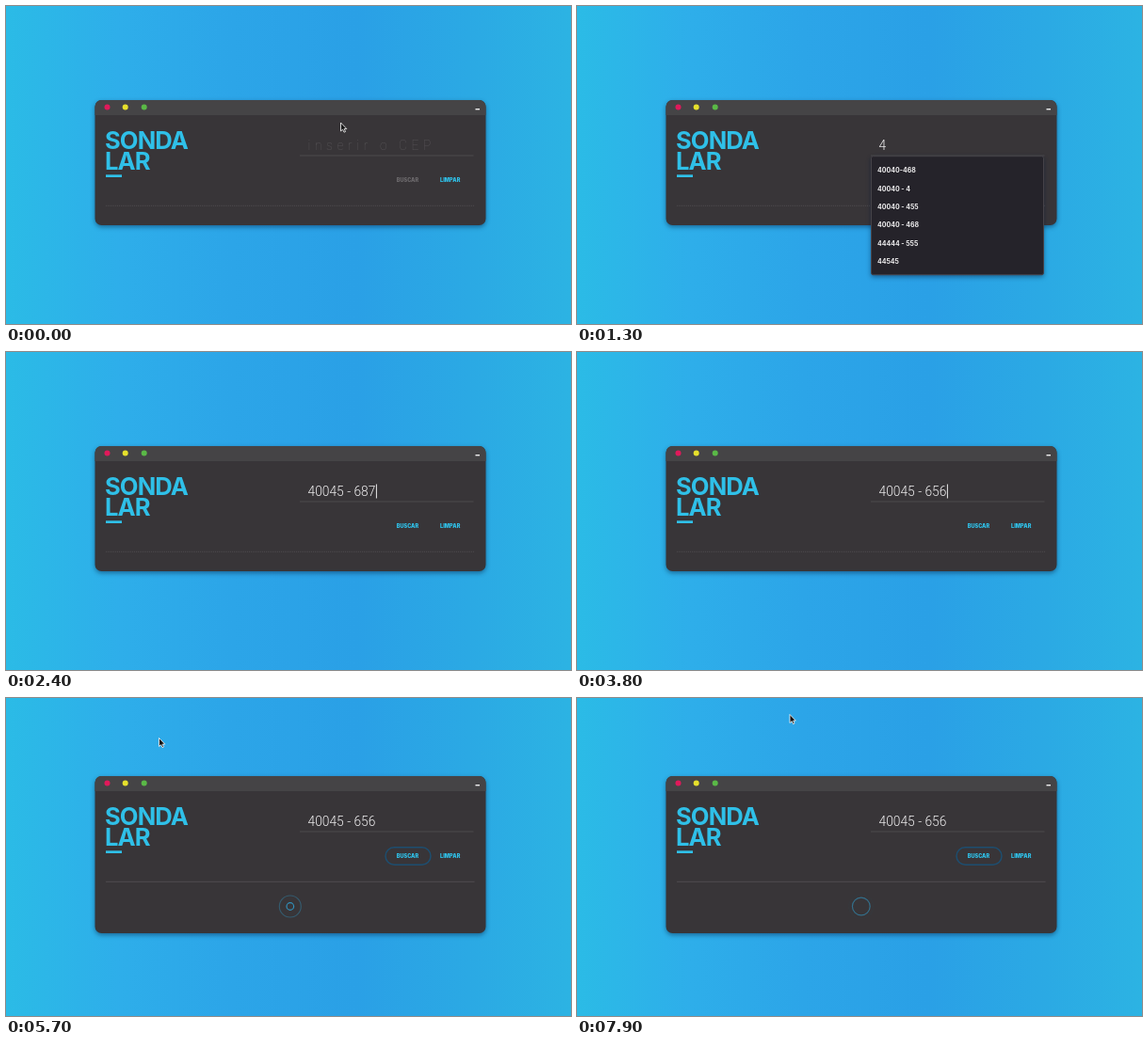
These frames come from a looping animation (600 px wide and 338 px high, 8 s). An HTML page:

```html
<!DOCTYPE html>
<html lang="pt-BR">
<head>
<meta charset="utf-8">
<title>Consulta</title>
<style>
  html, body { margin: 0; width: 100%; height: 100%; overflow: hidden; background: #2ba8e7; }
  svg { display: block; width: 600px; height: 338px; }
  text { white-space: pre; }
  .title { font: 700 25.6px Inter, sans-serif; letter-spacing: -.9px; fill: #2fc0e8; }
  .field { font: 300 13.8px Roboto, sans-serif; fill: #f0eff0; }
  .hint { font: 100 13.8px Roboto, sans-serif; letter-spacing: 4.6px; fill: #5a575a; }
  .button { font: 900 5.5px Inter, sans-serif; letter-spacing: .05px; fill: #2fc0e8; }
  .option { font: 700 7px Inter, sans-serif; fill: #f0eff0; }
  .shadow { filter: drop-shadow(0 2px 2.5px rgba(0, 20, 50, .45)); }
</style>
</head>
<body>
<svg viewBox="0 0 600 338">
  <defs>
    <linearGradient id="sky">
      <stop offset="0" stop-color="#2bbbe6"/>
      <stop offset=".2" stop-color="#2eaeea"/>
      <stop offset=".4" stop-color="#2ca5e8"/>
      <stop offset=".62" stop-color="#2aa0e6"/>
      <stop offset=".82" stop-color="#2ba9e4"/>
      <stop offset="1" stop-color="#2cb3e3"/>
    </linearGradient>
  </defs>
  <rect width="600" height="338" fill="url(#sky)"/>

  <g id="win">
    <rect id="body" class="shadow" x="94.5" y="100" width="415" height="133" rx="7" fill="#383538"/>
    <path d="M94.5 116V107a7 7 0 0 1 7-7H502.500a7 7 0 0 1 7 7V116Z" fill="#454446"/>
    <circle cx="107.500" cy="107.500" r="3" fill="#e0195a"/>
    <circle cx="126.700" cy="107.500" r="3" fill="#e6e02c"/>
    <circle cx="146.700" cy="107.500" r="3" fill="#5ab947"/>
    <rect x="498.500" y="109" width="4.500" height="1.400" fill="#eee"/>

    <text class="title" x="105" y="152.300">SONDA</text>
    <text class="title" x="105" y="174.300">LAR</text>
    <rect x="106" y="179.300" width="17" height="2.700" fill="#2fc0e8"/>

    <text id="hint" class="hint" x="320.500" y="153">inserir o CEP</text>
    <text id="field" class="field" x="320.500" y="153"></text>
    <rect id="caret" y="140.500" width="1" height="15" fill="#e8e8e8"/>
    <path d="M312 159H496.500" stroke="#4d4a4d"/>

    <rect id="ring" x="403" y="175.800" width="48" height="18.400" rx="9.200" fill="none" stroke="#1d4e70" stroke-width="1.500"/>
    <text id="search" class="button" x="414.700" y="187">BUSCAR</text>
    <text class="button" x="461" y="187">LIMPAR</text>
    <path id="divider" d="M106 212.300H497.500" stroke="#4f4c4f"/>

    <g id="loader" fill="none" stroke="#2fa8dc" stroke-width="1.200">
      <circle cx="301.800" cy="238.500"/>
      <circle cx="301.800" cy="238.500"/>
    </g>
  </g>

  <g id="menu">
    <rect id="panel" class="shadow" x="312.500" y="159.700" width="183" rx="2" fill="#25232a" stroke="#454349"/>
  </g>

  <path id="pointer" d="M0 0V9L2.100 7.200L3.500 10.200L5 9.500L3.700 6.600H6.300Z" fill="#151515" stroke="#fff" stroke-width=".8"/>
</svg>
<script>
const LOOP = 8000, STEP = 100, RIPPLE = 510;
const OPTIONS = ['40040-468', '40040 - 4', '40040 - 455', '40040 - 468', '44444 - 555', '44545'];

// Field contents from each moment on; the first entry is the focus.
const KEYS = [
  [500, ''], [800, '4'], [1500, '40'], [1700, '400'], [1800, '4004'], [1900, '40045'],
  [2000, '40045 - '], [2100, '40045 - 6'], [2200, '40045 - 68'], [2300, '40045 - 687'],
  [2900, '40045 - 68'], [3000, '40045 - 6'], [3300, '40045 - 65'], [3500, '40045 - 656']
];

// Pointer paths: time, x, y
const PATHS = [
  [[0, 355.5, 124], [100, 357, 127], [400, 366, 146]],
  [[4000, 418, 166], [4100, 426, 183], [4300, 427, 184], [4600, 214, 98], [4800, 136, 73],
   [4900, 131.500, 69.500], [5000, 131.500, 69], [5500, 160, 42.500], [5900, 165, 42.500],
   [6500, 165, 42.500], [7200, 215, 17.500], [7800, 226, 17.500], [8000, 226, 17.500]]
];
const CLICK = 4200;

const $ = id => document.getElementById(id);
const show = (el, on) => el.setAttribute('visibility', on ? 'visible' : 'hidden');
const clamp = v => Math.min(1, Math.max(0, v));
const smooth = v => v * v * (3 - 2 * v);

const rows = OPTIONS.map((label, i) => {
  const row = document.createElementNS('http://www.w3.org/2000/svg', 'text');
  row.setAttribute('class', 'option');
  row.setAttribute('x', 319);
  row.setAttribute('y', 177.2 + 19.4 * i);
  row.textContent = label;
  $('menu').append(row);
  return row;
});

function pointerAt(t) {
  const path = PATHS.find(p => t >= p[0][0] && t <= p[p.length - 1][0]);
  if (!path) return null;
  const i = Math.max(1, path.findIndex(p => p[0] >= t));
  const [a, b] = [path[i - 1], path[i]];
  const k = smooth(clamp((t - a[0]) / (b[0] - a[0])));
  return [a[1] + (b[1] - a[1]) * k, a[2] + (b[2] - a[2]) * k];
}

function drawField(t) {
  const key = KEYS.filter(k => k[0] <= t).pop();
  const value = key ? key[1] : '';
  $('field').textContent = value;
  show($('hint'), !value);
  show($('caret'), key && t < CLICK && (t - key[0]) % 1000 < 500);
  $('caret').setAttribute('x', 321 + (value ? $('field').getComputedTextLength() : 0));
  $('search').style.fill = value.length === 11 ? '#2fc0e8' : '#6b686b';

  const matches = value && t < 2900 ? OPTIONS.filter(o => o.startsWith(value)).length : 0;
  show($('menu'), matches);
  $('panel').setAttribute('height', 9.6 + 19.4 * matches);
  rows.forEach((row, i) => show(row, i < matches));
}

function drawWindow(t) {
  const grow = smooth(clamp((t - CLICK) / 400));
  $('win').setAttribute('transform', `translate(0 ${-17 * grow})`);
  $('body').setAttribute('height', 133 + 34 * grow);
  $('divider').setAttribute('stroke-dasharray', grow ? 'none' : '1 1');
  show($('ring'), t >= CLICK);
  show($('loader'), grow > .8);
  [...$('loader').children].forEach((ring, i) => {
    const p = ((t - 4900) / RIPPLE + .09 + i / 2 + 20) % 1;
    ring.setAttribute('r', 13 * (1 - (1 - p) ** 2));
    ring.setAttribute('opacity', .95 * (1 - p));
  });
}

function draw(t) {
  drawField(t);
  drawWindow(t);
  const at = pointerAt(t);
  show($('pointer'), at);
  if (at) $('pointer').setAttribute('transform', `translate(${at})`);
}

const start = performance.now();
function tick() {
  const t = (performance.now() - start) % LOOP;
  draw(Math.floor(t / STEP) * STEP);
  requestAnimationFrame(tick);
}
tick();
</script>
</body>
</html>
```
